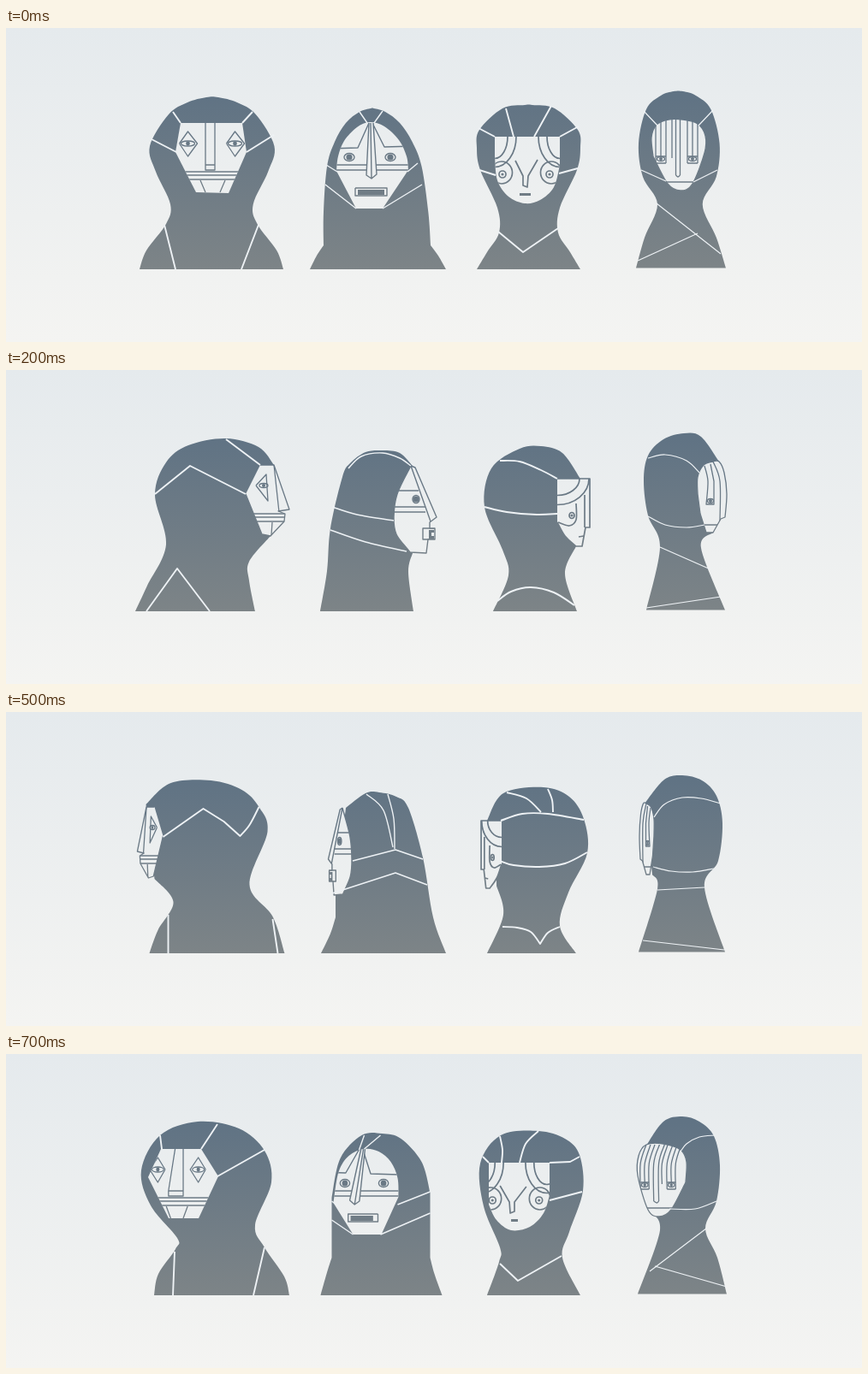
Animation, 1000 px wide and 367 px high, one loop 0.8 s. Source, as an HTML page with a canvas:

```html
<!DOCTYPE html>
<html lang="en">
<head>
<meta charset="utf-8">
<title>Turning heads</title>
<style>
html, body { margin: 0; width: 100%; height: 100%; overflow: hidden; background: #eceff0; }
canvas { display: block; width: 1000px; height: 367px; }
</style>
</head>
<body>
<canvas id="stage"></canvas>
<script>
const W = 1000, H = 367, STEP = 100, FLOOR = 282;
const canvas = document.getElementById("stage");
const ctx = canvas.getContext("2d");
const ratio = window.devicePixelRatio || 1;
canvas.width = W * ratio;
canvas.height = H * ratio;

function shade(y0, y1, from, to) {
  const g = ctx.createLinearGradient(0, y0, 0, y1);
  g.addColorStop(0, from);
  g.addColorStop(1, to);
  return g;
}
const paper = shade(0, H, "#e5eaed", "#f4f4f2");
const ink = shade(80, FLOOR, "#607384", "#7d8487");
const seamColor = "#eef2f5";

// Horizontal mapping [from, to, scale] that turns a face on its head
const still = [0, 0, 1];
let warp = still;
const wx = x => warp[1] + (x - warp[0]) * warp[2];

// Spaces join points smoothly, "/" makes a corner, ";" starts a new stroke
const parse = text => text.split(";").map(stroke =>
  stroke.split("/").map(piece => piece.split(" ").map(p => p.split(",").map(Number))));

// Catmull-Rom curves through the pieces of every stroke
function trace(strokes) {
  const path = new Path2D();
  for (const pieces of strokes)
    pieces.forEach((piece, n) => {
      const p = piece.map(([x, y]) => [wx(x), y]);
      path[n ? "lineTo" : "moveTo"](...p[0]);
      for (let i = 0; i < p.length - 1; i++) {
        const b = p[i], c = p[i + 1], a = p[i - 1] || b, d = p[i + 2] || c;
        path.bezierCurveTo(
          b[0] + (c[0] - a[0]) / 6, b[1] + (c[1] - a[1]) / 6,
          c[0] - (d[0] - b[0]) / 6, c[1] - (d[1] - b[1]) / 6, ...c);
      }
    });
  return path;
}

const flip = (head, piece) =>
  piece.map(([x, y]) => [2 * (head.axis + head.lean * (FLOOR - y)) - x, y]).reverse();

// Full outline from its left half
function symmetric(head, text) {
  const left = parse(text)[0];
  const top = left.pop();
  const right = left.map(p => flip(head, p)).reverse();
  return [[...left, [...top, ...flip(head, top)], ...right]];
}

const line = text => ctx.stroke(trace(parse(text)));

function shape(text, color) {
  ctx.fillStyle = color;
  ctx.fill(trace(parse(text)));
}

function ring(x, y, rx, ry) {
  ctx.beginPath();
  ctx.ellipse(wx(x), y, rx * warp[2], ry, 0, 0, Math.PI * 2);
  ctx.stroke();
}

function eye(x, y, rx, ry, pupil = ry * 0.8) {
  ring(x, y, rx, ry);
  ctx.beginPath();
  ctx.ellipse(wx(x), y, pupil * warp[2], pupil, 0, 0, Math.PI * 2);
  ctx.fillStyle = ink;
  ctx.fill();
}

// Rows of straight lines; the face clips their ends
function rows(x0, x1, ...ys) {
  for (const y of ys) line(`${x0},${y}/${x1},${y}`);
}

// Bodies and seams: front, quarter, side, rear quarter, (seams only) back.
// Front bodies and back seams give the left half.
const heads = [
  {
    axis: 240, lean: 0.005, seam: 1.9, pen: 1.3, mirror: [489, 480, 479.5],
    turn: [240, 288, 0.86], squeeze: [280, 296, 0.59],
    body: [
      "156,282 164,260 187,229 192,206 175,168 168,138 190,101 212,87 234,81",
      "158,282 164,260 187,226 198,200 179,150 187,113 217,87 265,79 309,95 331,136 320,177 289,215 291,228 311,257 316,282",
      "151,282 165,252 187,204 174,146 187,108 213,88 257,80 295,90 313,111/309,194/309,194 284,224 284,246 291,282",
      "154,282 168,239 195,202 174,140 184,111 204,91 240,80 287,83 316,108/306,195/306,195 284,222 302,255 312,282"
    ],
    seams: [
      "195,98/204,111;288,98/276,111;170,130/199,145;313,125/281,145;185,230/198,282;295,230/275,282",
      "242,82/261,111;187,112/242,143;309,95/307,111;187,226/200,282;292,231/294,282",
      "257,81/297,111;174,145/215,112/280,145;164,282/200,232/238,282",
      "184,111 195,132 206,145/225,128 249,113/296,146;168,242/162,282;290,237/290,282",
      "171,134 183,128 197,113/240,145;178,239/174,282"
    ],
    face: [
      "204,111/276,111/281,145/260,193/222,192/198,145",
      "261,111/308,111/323,144/299,192/264,192/241,143",
      "297,111/313,111/331,163/318,165/326,168/325,177/309,194/299,192/280,145"
    ],
    front(turn) {
      const tip = 244 + 9 * turn;
      line(`233,111/233,166/${tip},166/${tip},160/244,111;233,160/${tip},160`);
      rows(190, 290, 168, 172, 177);
      line("227,178/233,192;256,178/250,192");
      for (const x of [212.5, 267.5]) {
        line(`${x - 10},135/${x},121/${x + 11},135/${x},150/${x - 10},135`);
        eye(x, 135, 8, 3);
      }
    },
    side() {
      line("313,111/319,166;292,135/304,122/306,153/292,135;311,178/310,193");
      rows(270, 330, 168, 172, 177);
      eye(301, 135, 5, 2.5);
    }
  },
  {
    axis: 434.5, lean: -0.035, seam: 1.4, pen: 1.4, mirror: [867.5, 867, 866],
    turn: [425, 449, 0.94], squeeze: [453, 462, 0.55],
    body: [
      "355,282 363,266 371,254/371,254 371,215 375,162 384,133 397,111 413,98 426,94",
      "358,282 367,257 372,238/372,162/372,162 382,126 406,99 428,93 452,95 477,122 487,168/487,238/487,238 493,257 500,282",
      "367,282 375,235 379,185 393,125 402,109 420,96 440,94 460,97 475,112/475,214/475,214 470,236 476,282",
      "352,282 367,240 379,170 396,112 410,99 430,94 446,95 469,112/481,212/481,240/481,240 487,259 498,282"
    ],
    seams: [
      "374,160/387,168;373,183/409,211;413,98/422,111;440,97/430,111;481,158/469,168;486,183/440,211",
      "372,161/410,176;372,186/430,211;430,95/449,111;449,95/455,112;487,172/479,178;487,194/462,211",
      "400,115 415,101 440,97 460,103 473,112;381,160 410,169 453,176;379,187 420,201 468,212",
      "379,172/411,161/461,174;374,202/411,188/485,212;420,96 413,125 412,160;445,96 425,115 414,158",
      "376,173/434,161;373,204/434,188;422,96 430,125 433,160"
    ],
    face: [
      "386,167 388,150 395,132 410,116 425,110 442,115 459,131 468,150 470,166/440,211/409,211",
      "409,167 410,145 418,126 432,114 449,111 467,119 479,138 485,174/462,211/429,211",
      "473,112/478,114/503,172/495,178/495,185/501,185/501,198/493,198/491,214/472,213/468,208 456,192 453,172 457,145 473,112"
    ],
    front(turn) {
      const s = 10 * turn, b = 6 * turn;
      line(`380,141/${411 + b},140/${424 + b / 2},111;${428 + b / 2},111/${442 + b},139/480,138`);
      rows(375, 485, 160, 166);
      const nose = `424,111/${421 + s},172/${427 + s},176/${433 + s},171/429,111`;
      shape(nose, paper);
      line(`${nose};426,111/${427 + s},176`);
      line("408,187/445,187/445,196/408,196/408,187");
      shape(`${411 + b / 2},189/442,189/442,195/${411 + b / 2},195`, ink);
      for (const x of [401, 449]) eye(x, 151, 6, 4.5);
    },
    side() {
      line("473,112/496,177;459,141/482,141;501,185/487,185/487,198/501,198");
      rows(445, 490, 160, 166);
      shape("494,187/500,187/500,190/497,190/497,194/500,194/500,197/494,197", ink);
      eye(479, 151, 4, 4.5);
    }
  },
  {
    axis: 610.5, lean: 0, seam: 1.9, pen: 1.7, mirror: [1225, 1230, 1233],
    turn: [607.5, 629.5, 0.99], squeeze: [644, 654, 0.63],
    body: [
      "550,282 562,262 576,239 574,210 554,166 550,140 553,119 580,94 606,90",
      "554,282 575,238 567,208 551,160 555,118 572,99 603,90 647,95 671,128 667,178 648,226 649,243 663,282",
      "569,282 587,240 580,210 559,160 567,115 600,92 625,89 650,97 671,127/666,206/666,206 653,238 667,282",
      "567,282 586,250 576,211 554,165 558,125 575,99 605,88 652,95 671,127/660,127/660,203/660,203 652,237 671,282"
    ],
    seams: [
      "584,94/593,127;637,91/617,127;552,117/571,127;669,115/647,127;553,166/572,172;668,164/646,170;575,238/604,262/648,232",
      "555,120/566,126/590,127;603,90 618,105 625,127;648,96 645,112 646,127;668,120/661,127;552,161/590,171;576,236/627,265/648,245",
      "577,106 600,107 625,117 644,127;559,160 585,166 620,169 644,168;574,270 590,259 613,254 640,260 664,275",
      "558,126 600,119 630,119 655,127;554,164 580,177 610,181 640,179 656,174;600,90 595,103 594,117;648,94 625,101 608,117;586,251 600,258 609,271/609,271 620,257 636,252 653,251",
      "551,125 590,118 611,117;553,164 585,178 611,181;597,91 607,103 610,117;575,246 600,255 611,272"
    ],
    face: [
      "571,127/647,127/647,160/647,160 640,186 624,201 606,205 587,197 574,178 571,150",
      "590,127/661,127/661,176/661,176 652,194 635,206 613,202 597,186 590,165",
      "644,127/682,127/682,184/677,184/673,206/666,206/666,206 653,194 644,178"
    ],
    front(turn) {
      const s = 5 * turn;
      for (const x of [571, 647]) for (const r of [15, 25]) ring(x, 127, r, r + 10.5);
      for (const x of [579, 637]) ring(x, 169, 12.5, 13);
      const nose = `595,155/${604 + s},173/${604 + s},184/${609 + s},186/${610 + s},173/${621 + s},154`;
      shape(nose, paper);
      line(nose);
      for (const x of [580, 635]) eye(x, 171, 4, 4, 1.6);
      shape(`${600 + s},193/613,193/613,196/${600 + s},196`, ink);
    },
    side() {
      for (const r of [26, 37]) ring(644, 127, r, r - 6.5);
      line("676,146/676,184;645,178 658,182 666,175 666,156;669,195/675,194");
      eye(661, 170, 3, 3.5, 1.6);
    }
  },
  {
    axis: 788.5, lean: -0.015, seam: 1.2, pen: 1.3, mirror: [1580, 1584, 1577],
    turn: [785, 819.5, 0.84], squeeze: [808, 820, 0.5],
    body: [
      "736,280.5 746,245 761,206 744,174 739,135 748,95 765,79 780,74",
      "738,280.5 749,238 763,204 750,172 746,130 753,96 770,79 790,73 812,79 832,107/829,183/829,183 816,206 842,280.5",
      "748,280.5 764,207 750,170 745,130 750,100 768,81 792,74 812,78 833,107/826,190/826,190 812,208 840,280.5",
      "737,280.5 761,205 745,174 740,130 747,98 764,80 787,74 808,79 831,107/822,190/822,190 816,207 838,280.5"
    ],
    seams: [
      "745,97/762,115;826,96/809,114;742,166/771,179;831,166/803,180;760,205/835,264;738,272/808,240",
      "752,95 770,97 785,105 792,114;750,172 775,181 805,181;762,204/828,254;738,272/822,248",
      "750,103 770,99 795,106 810,120;750,171 770,181 795,184 816,181;764,207/823,233;748,278/835,265",
      "742,107 765,101 787,100 808,108 820,123;750,183 775,187 800,186 821,181;761,205/816,208;738,278/833,267",
      "743,107 765,101 788,99;748,181 770,186 788,187;760,206/788,206"
    ],
    face: [
      "756,150 754,128 760,113 774,107 790,107 808,112 817,126 816,146 802,182 788,190 773,182 756,150",
      "786,150 785,126 792,112 812,105 832,106 841,119 842,142 830,182 817,190 803,182 786,150",
      "808,145 808,125 815,111 826,107 833,107 839,120 842,145 840,172/835,174/826,190/818,190/811,168 808,145"
    ],
    front(turn) {
      const bar = (x, end) => line(`${x - 8 * turn},106 ${x},128 ${x},${end}`);
      for (const x of [765, 802]) {
        bar(x - 6, 158);
        bar(x, 150);
        bar(x + 6, 158);
        rows(x - 6, x + 6, 150, 158);
        eye(x, 153, 4.5, 2.5);
      }
      bar(778, 152);
      bar(782.5, 172);
      bar(787.5 + 2 * turn, 172);
      line(`782.5,172 785,174 ${787.5 + 2 * turn},172`);
      rows(740, 830, 180);
    },
    side() {
      line("826,107 834,130 834,176;816,112 820,130 818,157/827,157/827,130 823,110");
      rows(805, 832, 181);
      eye(823, 153, 3.5, 2.5);
    }
  }
];

function drawFace(head, pose) {
  const turned = pose % 2 === 1, profile = pose > 1;
  // The rear quarter is the profile squeezed; other faces have their own edge
  warp = pose === 3 ? head.squeeze : still;
  const edge = trace(parse(head.face[Math.min(pose, 2)]));
  ctx.save();
  ctx.fillStyle = paper;
  ctx.fill(edge);
  ctx.strokeStyle = ink;
  ctx.lineWidth = head.pen;
  if (profile || head.axis > 700) ctx.stroke(edge);
  ctx.clip(edge);
  if (pose === 1) warp = head.turn;
  if (profile) head.side();
  else head.front(turned ? 1 : 0);
  ctx.restore();
  warp = still;
}

function drawHead(head, pose) {
  const back = pose === 4;
  ctx.fillStyle = ink;
  ctx.fill(trace(pose % 4 ? parse(head.body[pose]) : symmetric(head, head.body[0])));
  if (!back) drawFace(head, pose);
  const seams = parse(head.seams[pose]);
  ctx.strokeStyle = seamColor;
  ctx.lineWidth = head.seam;
  ctx.stroke(trace(seams));
  if (back) ctx.stroke(trace(seams.map(s => s.map(p => flip(head, p)).reverse())));
}

function draw(now) {
  const step = Math.floor(now / STEP) % 8;
  const pose = step > 4 ? 8 - step : step;
  ctx.setTransform(ratio, 0, 0, ratio, 0, 0);
  ctx.lineJoin = "round";
  ctx.fillStyle = paper;
  ctx.fillRect(0, 0, W, H);
  for (const head of heads) {
    ctx.save();
    if (step > 4) {
      ctx.translate(head.mirror[pose - 1], 0);
      ctx.scale(-1, 1);
    }
    drawHead(head, pose);
    ctx.restore();
  }
  requestAnimationFrame(draw);
}
requestAnimationFrame(draw);
</script>
</body>
</html>
```
